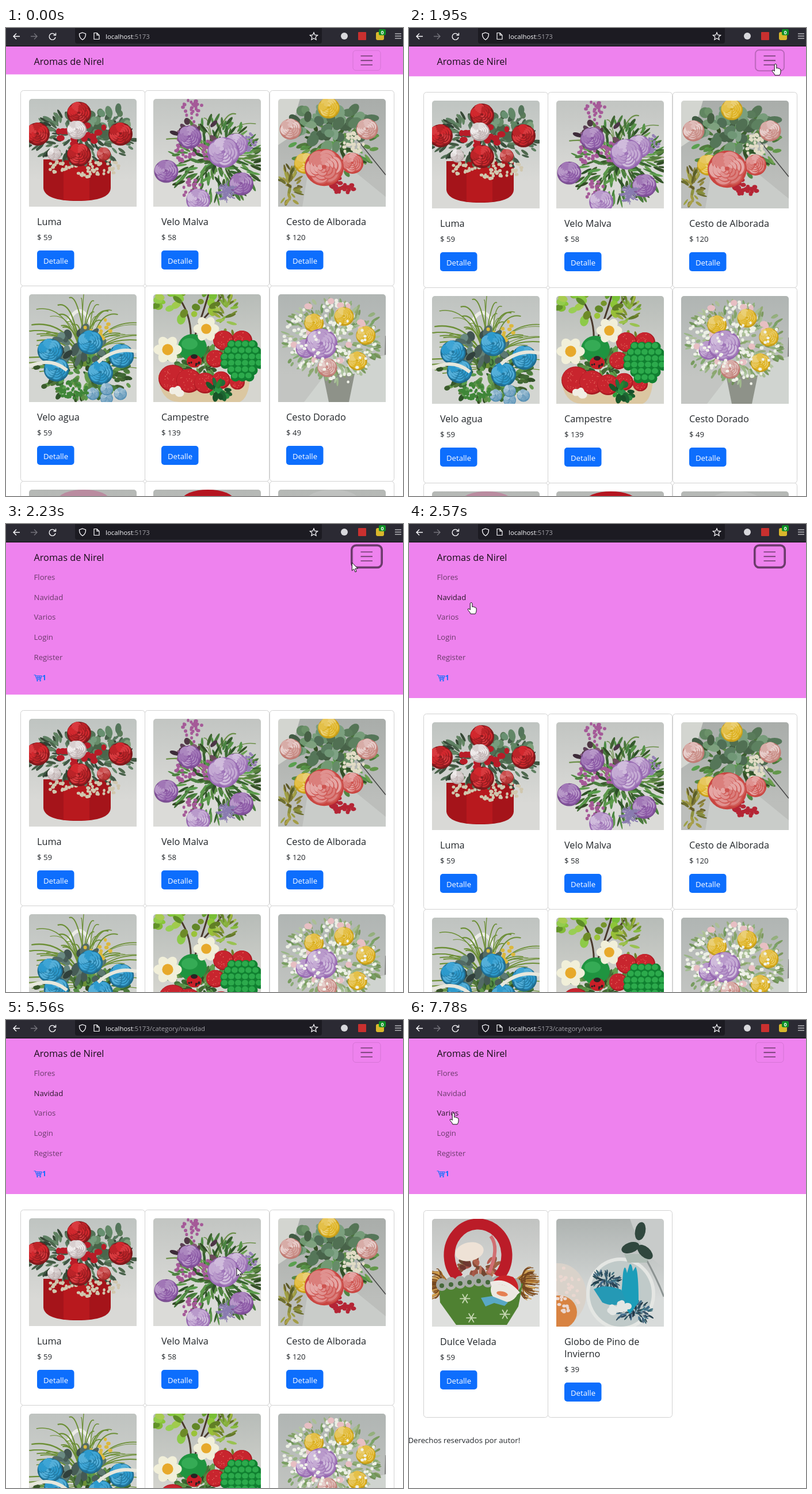
An HTML page with a canvas that plays this animation: 690x812 px, repeating every 8 s.

```html
<!DOCTYPE html>
<html lang="es">
<head>
<meta charset="utf-8">
<style>
html, body { margin: 0; width: 690px; height: 812px; overflow: hidden; background: #fff; }
canvas { display: block; }
</style>
</head>
<body>
<canvas id="stage" width="690" height="812"></canvas>
<script>
const ctx = document.getElementById('stage').getContext('2d');
const TAU = Math.PI * 2;
const UP = -TAU / 4;
const LOOP = 8000;
const SIZE = 187;

// ---------- product pictures ----------
let g, rnd;
const hsl = (h, s, l) => `hsl(${h} ${s}% ${l}%)`;

function makePhoto(draw, seed) {
  const c = document.createElement('canvas');
  c.width = c.height = SIZE;
  g = c.getContext('2d');
  rnd = () => {
    seed = (seed + 0x6d2b79f5) | 0;
    let n = Math.imul(seed ^ (seed >>> 15), 1 | seed);
    n = (n + Math.imul(n ^ (n >>> 7), 61 | n)) ^ n;
    return ((n ^ (n >>> 14)) >>> 0) / 4294967296;
  };
  draw();
  return c;
}

function backdrop(top, bottom) {
  const grad = g.createLinearGradient(0, 0, 0, SIZE);
  grad.addColorStop(0, top);
  grad.addColorStop(.75, bottom);
  g.fillStyle = grad;
  g.fillRect(0, 0, SIZE, SIZE);
}

function oval(x, y, rx, ry, color, angle = 0) {
  g.fillStyle = color;
  g.beginPath();
  g.ellipse(x, y, rx, ry, angle, 0, TAU);
  g.fill();
}

function shape(d, color) {
  g.fillStyle = color;
  g.fill(new Path2D(d));
}

function stroke(d, color, width) {
  g.strokeStyle = color;
  g.lineWidth = width;
  g.stroke(new Path2D(d));
}

// Calls put(x, y, i) for n points evenly spaced on an ellipse.
function ring(n, x, y, rx, ry, turn, put) {
  for (let i = 0; i < n; i++) {
    const a = turn + i * TAU / n;
    put(x + Math.cos(a) * rx, y + Math.sin(a) * ry, i, a);
  }
}

// Calls put(x, y, angle) for n random points inside an ellipse.
function scatter(n, x, y, rx, ry, put) {
  for (let i = 0; i < n; i++) {
    const a = rnd() * TAU, d = Math.sqrt(rnd());
    put(x + Math.cos(a) * d * rx, y + Math.sin(a) * d * ry, a);
  }
}

const dots = (n, x, y, rx, ry, r, color) =>
  scatter(n, x, y, rx, ry, (px, py) => oval(px, py, r * (.7 + rnd() * .5), r * .9, color));

const leaves = (n, x, y, rx, ry, len, width, [h, s, l]) =>
  scatter(n, x, y, rx, ry, (px, py, a) => oval(px, py, len * (.5 + rnd() * .6), width * (.6 + rnd() * .5),
    hsl(h + rnd() * 16 - 8, s, l + rnd() * 26 - 13), a + rnd() - .5));

function blades(n, x, y, from, to, len, color) {
  for (let i = 0; i < n; i++) {
    const a = from + (to - from) * rnd(), q = len * (.6 + rnd() * .5);
    const ex = x + Math.cos(a) * q, ey = y + Math.sin(a) * q;
    stroke(`M${x + rnd() * 20 - 10} ${y}Q${x + (ex - x) * .3} ${ey} ${ex} ${ey + q * .08}`, color, 1 + rnd() * 1.4);
  }
}

// A rose: ruffled outer petals, then folded layers towards the heart.
function bloom(x, y, r, [h, s, l]) {
  const turn = rnd() * TAU;
  oval(x, y + 1, r, r * .95, hsl(h, s, l - 20));
  for (let layer = 0; layer < 4; layer++) {
    const q = r * (1 - layer * .22);
    ring(6, x, y, q * .55, q * .5, turn + layer, (px, py, i, a) => {
      oval(px, py, q * .4, q * .47, hsl(h, s, l - 14), a);
      oval(px - 1, py - 1, q * .36, q * .43, hsl(h, s, l - 5 + (i + layer) % 3 * 5), a);
    });
  }
  oval(x, y, r * .12, r * .1, hsl(h, s, l - 16));
}

const RED = [358, 68, 49], WHITE = [0, 10, 88], LILAC = [278, 32, 75], VIOLET = [280, 30, 64],
  PINK = [2, 56, 72], YELLOW = [46, 74, 64], PALE = [6, 38, 80], BLUE = [199, 64, 54], SKY = [203, 38, 72];
const GREEN = [105, 34, 35], DEEP = [125, 15, 34], EUCALYPTUS = [125, 16, 44], MOSS = [93, 24, 58];

const roses = (n, x, y, rx, ry, turn, r, colors) =>
  ring(n, x, y, rx, ry, turn, (px, py, i) => bloom(px, py, r, colors[i % colors.length]));

function redPot() {
  backdrop('#bfc4c1', '#d9d9d6');
  shape('M25 105H142V155Q140 177 84 177Q28 177 25 155Z', '#a5141a');
  shape('M60 115H105V176H60Z', '#b8191e');
  leaves(170, 90, 70, 94, 48, 9, 3, DEEP);
  leaves(24, 135, 38, 40, 26, 10, 8, EUCALYPTUS);
  dots(80, 96, 118, 62, 18, 3, '#d0c7ae');
  dots(16, 95, 60, 45, 20, 6, '#b81c28');
  roses(4, 87, 60, 72, 36, UP, 21, [RED]);
  roses(2, 87, 95, 43, 3, 0, 12, [[0, 55, 60], WHITE]);
  bloom(83, 53, 17, WHITE);
}

function lilac() {
  backdrop('#c2c5c2', '#dbdbd8');
  blades(18, 105, 115, 3.4, 6.2, 100, '#6b8f48');
  leaves(210, 108, 108, 80, 74, 12, 2.6, GREEN);
  leaves(16, 75, 58, 42, 22, 10, 5, [320, 18, 32]);
  ring(4, 68, 88, 18, 68, UP, (x, y) => dots(24, x, y, 18, 20, 3.2, '#a55a98'));
  dots(24, 170, 76, 14, 16, 2.5, '#9580b5');
  roses(5, 92, 118, 70, 58, -2, 21, [VIOLET, LILAC]);
  bloom(122, 92, 28, LILAC);
  blades(40, 128, 160, 0, TAU, 18, '#8a7cb0');
}

function spring() {
  backdrop('#a9adaa', '#bcbebb');
  shape('M0 0H38L18 68L0 80Z', '#d3d5d0');
  shape('M52 127H134L187 170V187H42Z', '#c9ccc9');
  stroke('M132 64L187 132', '#454545', 1.5);
  leaves(90, 95, 75, 76, 58, 10, 3.5, GREEN);
  leaves(45, 98, 46, 75, 40, 12, 9, EUCALYPTUS);
  leaves(36, 20, 151, 20, 34, 9, 2.5, [58, 40, 38]);
  dots(34, 130, 77, 20, 20, 3.3, '#e1dcc6');
  dots(28, 112, 150, 22, 13, 4, '#b52535');
  roses(5, 88, 68, 70, 53, UP, 19, [YELLOW, PALE, PINK]);
  bloom(80, 118, 34, PINK);
}

function azure() {
  backdrop('#bfc3c0', '#d4d6d2');
  stroke('M68 48Q90 5 111 58', '#ecece7', 6);
  blades(45, 95, 125, 3.1, 6.3, 125, '#6c8f36');
  leaves(150, 96, 138, 86, 45, 9, 4, GREEN);
  leaves(34, 85, 90, 50, 30, 11, 7, [165, 13, 35]);
  dots(18, 120, 62, 25, 22, 3.5, '#dbb83c');
  roses(5, 95, 110, 66, 28, -1.4, 22, [BLUE]);
  roses(4, 135, 172, 24, 8, 0, 11, [SKY]);
  stroke('M0 125Q38 108 66 132M120 118Q150 91 187 99', '#e7e7dc', 6);
  dots(50, 75, 165, 28, 16, 3, '#3f8638');
}

function daisy(x, y, r) {
  ring(6, x, y, r * .55, r * .55, 0, (px, py, i, a) => oval(px, py, r * .52, r * .4, '#f1efd9', a));
  oval(x, y, r * .42, r * .42, '#e7a92b');
}

function berry(x, y, r) {
  oval(x, y, r, r * .95, '#a81a22');
  oval(x - 1, y - 1, r * .92, r * .87, '#c8252e');
  dots(r, x, y, r * .8, r * .75, .8, '#e76e62');
}

function orchard() {
  backdrop('#b7bcb8', '#d6d6d0');
  stroke('M65 82Q68 35 40 0M72 73Q88 28 96 0M78 52Q105 25 118 4', '#4a392c', 3);
  leaves(26, 60, 18, 58, 26, 10, 7, [84, 55, 45]);
  leaves(34, 125, 38, 23, 42, 9, 2.5, [78, 48, 42]);
  shape('M8 140Q12 187 45 187H150Q166 180 168 145Z', '#dbc7a1');
  leaves(70, 85, 125, 62, 34, 11, 4, GREEN);
  for (let i = 0; i < 5; i++) berry(34 + i * 28, 146 + i * 4 % 9, 25 - i * 3);
  ring(2, 138, 80, 16, 3, 0, (x, y) => berry(x, y, 18));
  berry(108, 112, 16);
  oval(68, 92, 25, 23, '#1f9440');
  oval(63, 86, 14, 10, '#35ab55');
  daisy(92, 60, 21);
  daisy(25, 96, 23);
  oval(71, 116, 13, 11, '#c91f28');
  oval(71, 108, 6, 4, '#282423');
  dots(6, 71, 118, 9, 7, 2, '#282423');
  for (let row = 0; row < 6; row++) {
    const n = Math.round(3 + 3 * Math.sin(row * .6 + .3));
    for (let i = 0; i < n; i++) {
      const x = 155 + (i - (n - 1) / 2) * 12, y = 88 + row * 11;
      oval(x, y, 8.5, 8.5, '#118031');
      oval(x - 1.5, y - 2, 5.5, 5, '#2caa4c');
    }
  }
  leaves(18, 112, 165, 25, 15, 9, 5, [134, 55, 33]);
  dots(6, 42, 169, 12, 4, 7, '#f1eee4');
}

function pastel() {
  backdrop('#b0b5b3', '#c3c5c2');
  stroke('M187 72L184 187', '#666', 1.5);
  shape('M85 135L187 105V187H45Z', '#d0d4d0');
  shape('M78 138H133L123 187H88Z', '#8e9289');
  leaves(260, 95, 80, 87, 72, 8, 2.6, MOSS);
  dots(120, 94, 78, 84, 70, 3.3, '#ecefe5');
  dots(16, 90, 70, 70, 60, 6, '#e7bfc3');
  roses(6, 100, 82, 54, 46, -.25, 17, [YELLOW, YELLOW, PALE, LILAC]);
  bloom(75, 85, 28, LILAC);
  dots(50, 94, 96, 78, 60, 2.8, '#f0f2e9');
}

function feltBasket() {
  backdrop('#c1c3c1', '#dedfdd');
  leaves(30, 80, 84, 38, 16, 10, 4, [15, 40, 42]);
  oval(65, 57, 25, 16, '#eee2d6', -.2);
  stroke('M102 30Q118 50 99 94', '#d16f72', 6);
  for (const gold of ['#a66d2d', '#d0a050', '#754720']) {
    blades(22, 20, 112, 2.1, 4.4, 32, gold);
    blades(22, 152, 110, -1, 1.2, 34, gold);
  }
  g.strokeStyle = '#bb1c28';
  g.lineWidth = 19;
  g.beginPath();
  g.ellipse(80, 63, 50, 54, 0, 2.3, TAU + .8);
  g.stroke();
  shape('M12 112H158L150 152L130 184H42L14 145Z', '#4f8132');
  for (let i = 0; i < 9; i++) {
    const x = 17 + i * 16, y = 106 + Math.abs(4 - i) * 2;
    oval(x, y, 10, 11, '#a6aaa5');
    oval(x, y + 2, 4, 4, '#45693a');
  }
  ring(4, 92, 152, 42, 24, .6, (x, y) =>
    ring(6, x, y, 9, 9, 0, (px, py) => stroke(`M${x} ${y}L${px} ${py}`, '#c9d9b6', 1.8)));
  oval(126, 123, 24, 22, '#ece8e1');
  shape('M103 113Q116 91 141 101Q153 113 149 129Q129 111 103 113Z', '#c92328');
  stroke('M102 113Q128 103 150 130', '#eee9e4', 7);
  oval(122, 130, 10, 4, '#e58052', .2);
  shape('M85 137L104 134L132 145L126 151L108 146L93 152Z', '#59a8c5');
}

function glassBall() {
  backdrop('#aeb3b1', '#d8dbda');
  shape('M128 0Q147 60 187 85V0Z', '#c8cbca');
  stroke('M154 66Q175 104 187 135', '#8c9392', 3);
  oval(3, 131, 49, 54, '#d9d2ca');
  oval(5, 162, 31, 29, '#d88342');
  dots(45, 12, 125, 32, 40, 3, '#ead7d0');
  oval(112, 130, 60, 63, '#e4e6e3');
  oval(112, 130, 54, 57, '#c0cac9');
  shape('M118 61H164L157 76H124Z', '#aebbb4');
  ring(3, 143, 43, 15, 22, UP + .2, (x, y, i, a) => oval(x, y, 16, 9, '#30473e', a));
  leaves(70, 85, 107, 25, 16, 6, 1.5, [200, 35, 31]);
  leaves(80, 135, 162, 34, 20, 6, 1.5, [200, 35, 31]);
  shape('M112 145L116 94Q119 75 123 94L127 80Q131 75 133 91L138 83Q143 93 143 145L128 165Z', '#1c9db9');
  shape('M65 122Q85 112 113 123L122 145Q99 154 80 145Z', '#2599b5');
  dots(14, 109, 154, 18, 10, 6, '#e3e6e4');
}

const peek = color => () => {
  backdrop('#b5b8b5', '#cfd0ce');
  oval(95, 18, 45, 18, color);
};

const product = ([name, price, draw], i) =>
  ({ lines: name.split('|'), price, photo: makePhoto(draw, 11 + i * 7) });
const catalog = [
  ['Luma', 59, redPot], ['Velo Malva', 58, lilac], ['Cesto de Alborada', 120, spring],
  ['Velo agua', 59, azure], ['Campestre', 139, orchard], ['Cesto Dorado', 49, pastel],
  ['', 0, peek('#ba8ca0')], ['', 0, peek('#b51520')], ['', 0, peek('#bfc1bf')]
].map(product);
const seasonal = [
  ['Dulce Velada', 59, feltBasket], ['Globo de Pino de|Invierno', 39, glassBall]
].map(product);

// ---------- page ----------
const INK = '#212529';

function text(s, x, y, size, color, weight = 400) {
  ctx.font = `${weight} ${size}px "Open Sans", "Noto Sans", sans-serif`;
  ctx.fillStyle = color;
  ctx.fillText(s, x, y);
}

function box(x, y, w, h, r, fill, border, width = 1) {
  ctx.beginPath();
  ctx.roundRect(x, y, w, h, r);
  if (fill) { ctx.fillStyle = fill; ctx.fill(); }
  if (border) { ctx.strokeStyle = border; ctx.lineWidth = width; ctx.stroke(); }
}

function line(d, color, width) {
  ctx.strokeStyle = color;
  ctx.lineWidth = width;
  ctx.stroke(new Path2D(d));
}

function disc(x, y, r, color) {
  ctx.fillStyle = color;
  ctx.beginPath();
  ctx.arc(x, y, r, 0, TAU);
  ctx.fill();
}

function drawCard({ lines, price, photo }, x, y, h) {
  box(x + .5, y + .5, 216, h, 5, '#fff', '#d2d2d2');
  ctx.save();
  ctx.beginPath();
  ctx.roundRect(x + 15, y + 15, SIZE, SIZE, [5, 5, 0, 0]);
  ctx.clip();
  ctx.drawImage(photo, x + 15, y + 15);
  ctx.restore();
  if (!price) return;
  const left = x + 29;
  lines.forEach((s, i) => text(s, left, y + 234 + i * 21, 16.3, INK));
  y += (lines.length - 1) * 21;
  text('$ ' + price, left, y + 260, 13.2, INK);
  box(left, y + 278, 64.5, 33, 5, '#0d6efd');
  text('Detalle', left + 11, y + 301, 13.2, '#fff');
}

function drawCards(items, top, h) {
  items.forEach((p, i) =>
    drawCard(p, Math.floor(25.5 + i % 3 * 216.4), Math.floor(top + Math.floor(i / 3) * 339.2), h));
}

function drawBrowser(route, badge) {
  const white = '#fbfbfe';
  ctx.fillStyle = '#2b2a33';
  ctx.fillRect(0, 0, 690, 32);
  ctx.fillStyle = '#0c0c0d';
  ctx.fillRect(0, 31, 690, 1);
  box(120, -4, 429, 31, 4, '#1c1b22');
  line('M24 14.5H13M18 9.5L13 14.5L18 19.5', white, 1.4);
  line('M43 14.5H54M49 9.5L54 14.5L49 19.5', '#74737b', 1.4);
  line('M85 11.5A5.5 5.5 0 1 0 86 16M86.5 8.5V12.5H82.5', white, 1.4);
  line('M133 8L138.5 10Q139 17 133 20.5Q127 17 127.5 10Z', white, 1.3);
  line('M153 8.5H158L162 12.5V19.5H153ZM158 8.5V12.5H162', white, 1.2);
  const star = Array.from({ length: 10 }, (_, i) => {
    const a = UP + i * TAU / 10, r = i % 2 ? 3.2 : 7;
    return `${535 + Math.cos(a) * r} ${14.7 + Math.sin(a) * r}`;
  });
  line(`M${star.join('L')}Z`, white, 1.2);
  text('localhost', 173, 19, 11.4, white);
  text(':5173' + route, 173 + ctx.measureText('localhost').width, 19, 11.4, '#a3a2a8');
  disc(588, 14, 6, '#d8d8dc');
  box(612, 7, 14, 14, 1, '#c9302f');
  box(643, 7, 14, 14, 3, '#d9b72c');
  if (badge) {
    box(648, 2, 12, 10.5, 2, '#0c8f24');
    text('0', 651.4, 10.6, 9, '#fff', 700);
  }
  line('M676 10H687M676 14H687M676 18H687', white, 1.2);
}

const links = ['Flores', 'Navidad', 'Varios', 'Login', 'Register'];
const MENU_TOP = 75, LINK_H = 34.7;

function drawNav(bottom, focus, active, hover) {
  const dim = 'rgba(0,0,0,.55)', dark = 'rgba(0,0,0,.82)', blue = '#0d6efd';
  ctx.fillStyle = '#ee82ee';
  ctx.fillRect(0, 32, 690, bottom - 32);
  text('Aromas de Nirel', 48.5, 64, 16.3, 'rgba(0,0,0,.9)');
  box(603, 39, 48, 34.5, 5, null, 'rgba(0,0,0,.1)');
  if (focus > 0) {
    const w = 3.5 * focus;
    box(602.5 - w / 2, 38.7 - w / 2, 49 + w, 35 + w, 6 + w / 2, null, `rgba(0,0,0,${.55 * focus})`, w);
  }
  line('M616.5 48.5H637M616.5 56.3H637M616.5 64H637', dim, 1.7);
  if (bottom - 7 <= MENU_TOP) return;
  ctx.save();
  ctx.beginPath();
  ctx.rect(0, MENU_TOP, 690, bottom - 7 - MENU_TOP);
  ctx.clip();
  links.forEach((s, i) => text(s, 48.5, 97 + i * LINK_H, 13.2, i === active || i === hover ? dark : dim));
  line('M48.5 262H51L53.5 269.5H60L62 263.5H52M53 266.5H61M55.5 263.5V269M58.5 263.5V269', blue, 1.1);
  disc(54.5, 271.7, 1.3, blue);
  disc(59.5, 271.7, 1.3, blue);
  text('1', 62.7, 270.5, 12.5, blue, 700);
  ctx.restore();
}

const arrow = new Path2D('M0 0V14L3.3 11L5.5 16.3L7.8 15.3L5.6 10.3H10Z');
const hand = new Path2D('M-1.8 1.5Q0 -1 1.8 1.5V8Q4 6.3 5 8.3Q7 7.3 7.5 9.3Q9 9 9 11V15Q8.5 18 7 20H-1Q-2 17 -5.5 13.5Q-6.5 10.6 -4 11L-1.8 13Z');

function drawCursor(x, y, outline) {
  ctx.save();
  ctx.translate(x, y);
  ctx.fillStyle = '#fff';
  ctx.fill(outline);
  ctx.strokeStyle = '#111';
  ctx.lineWidth = 1;
  ctx.stroke(outline);
  ctx.restore();
}

// ---------- timing ----------
const ENTER = 1260, OPEN = 1890, GROW = 1947, CLICK_1 = 3330, SWAP = 5690, CLICK_2 = 7290;

const STEP = 1000 / 15;
const snap = t => OPEN + Math.floor((t - OPEN) / STEP + .15) * STEP;

const clamp = v => Math.max(0, Math.min(1, v));
const smooth = v => v * v * (3 - 2 * v);

// CSS "ease": cubic-bezier(.25, .1, .25, 1)
function ease(p) {
  const curve = (u, a, b) => 3 * a * u * (1 - u) ** 2 + 3 * b * u * u * (1 - u) + u ** 3;
  if (p <= 0 || p >= 1) return clamp(p);
  let lo = 0, hi = 1;
  for (let i = 0; i < 20; i++) {
    const mid = (lo + hi) / 2;
    if (curve(mid, .25, .25) < p) lo = mid; else hi = mid;
  }
  return curve(lo, .1, 1);
}

// Where the pointer turns or rests: time, x, y.
const stops = [[ENTER, 676, 104], [1750, 637, 62], [2160, 637, 62], [2560, 108, 136], [3410, 68, 125],
  [3950, 244, 78], [4500, 300, 27], [5140, 341, 301], [5550, 401, 430], [5970, 440, 506],
  [6810, 66, 213], [7370, 77, 161]];

function pointer(t) {
  const i = stops.findIndex(s => s[0] > t);
  const [t0, x0, y0] = stops.at(i < 0 ? -1 : Math.max(0, i - 1));
  const [t1, x1, y1] = stops.at(i);
  const k = t1 > t0 ? smooth(clamp((t - t0) / (t1 - t0))) : 0;
  return [x0 + (x1 - x0) * k, y0 + (y1 - y0) * k];
}

const fade = (t, start) => smooth(clamp((t - start) / 150));
const within = (t, start, length) => t >= start && t < start + length;

function render(time) {
  const t = snap(time);
  const bottom = 80.5 + 221.5 * ease((t - GROW) / 350);
  const focus = fade(t, OPEN) - fade(t, CLICK_1 - 150);
  const [x, y] = pointer(t);
  const inMenu = bottom > 290 && within(y, MENU_TOP, LINK_H * 5);
  const onToggle = within(x, 602, 49) && within(y, 38, 36);
  const hover = inMenu && x < 115 ? Math.floor((y - MENU_TOP) / LINK_H) : -1;
  const active = t < CLICK_1 ? -1 : t < CLICK_2 ? 1 : 2;
  const loading = within(t, CLICK_1, 300) || within(t, CLICK_2, 300);

  ctx.fillStyle = '#fff';
  ctx.fillRect(0, 0, 690, 812);
  const top = Math.round(bottom) + 27.5;
  if (t < SWAP) {
    drawCards(catalog, top, 339);
  } else {
    drawCards(seasonal, top + .5, 359);
    text('Derechos reservados por autor!', -1.5, 734, 13.2, INK);
  }
  drawNav(bottom, focus, active, hover);
  drawBrowser(active < 0 ? '' : '/category/' + links[active].toLowerCase(), !loading);
  if (within(time, 660, 70)) drawCursor(686, 804, arrow);
  if (t >= ENTER) drawCursor(x, y, inMenu || onToggle ? hand : arrow);
}

function tick() {
  render(performance.now() % LOOP);
  requestAnimationFrame(tick);
}
tick();
</script>
</body>
</html>
```
